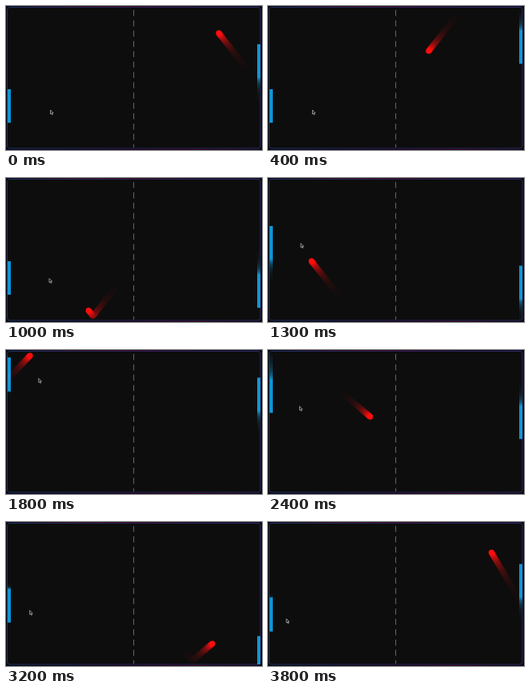
These frames come from a looping animation (320 by 180 pixels, 3900 ms). An HTML page with a canvas:

```html
<!DOCTYPE html>
<html lang="en">
<head>
<meta charset="utf-8">
<title>Paddle game</title>
<style>
html, body { margin: 0; width: 100%; height: 100%; overflow: hidden; background: #07070e; }
canvas { display: block; width: 320px; height: 180px; }
</style>
</head>
<body>
<canvas id="stage" width="320" height="180"></canvas>
<script>
const ctx = document.getElementById('stage').getContext('2d');
const LOOP = 3900, STEP = 100;
const SHADE = 13;                      // grey level of the board
const RED = [255, 0, 0], BLUE = [16, 150, 214];
const PADDLE_H = 41.5, BALL_R = 3.6;

// Linear between key points [time, ...values], held outside them.
function along(keys, t) {
  let i = 1;
  while (i < keys.length - 1 && keys[i][0] < t) i++;
  const [t0, ...from] = keys[i - 1], [t1, ...to] = keys[i];
  const k = Math.min(1, Math.max(0, (t - t0) / (t1 - t0)));
  return from.map((v, n) => v + (to[n] - v) * k);
}

// Folds a steadily growing distance into a bounce between two walls.
function bounce(distance, low, high) {
  const span = high - low;
  const d = ((distance % (2 * span)) + 2 * span) % (2 * span);
  return low + (d < span ? d : 2 * span - d);
}

// Vertical distance travelled; the slope changes at each paddle hit.
const climb = [[-200, -71], [1623, 303.5], [1800, 334], [3572, 577], [3800, 640]];

function ballAt(t) {
  return [
    bounce(0.1628 * t - 264.5, 1.5, 317.5),
    bounce(along(climb, t)[0], 4, 172.5)
  ];
}

// The mouse hand drives both the cursor and the left paddle.
const hand = [
  [1000, 55.5, 130], [1300, 41, 86], [1640, 41, 37], [2270, 40.5, 32],
  [2500, 39, 87], [3200, 30, 110], [3800, 23, 121]
];
const leftAt = t => along(hand, t)[1] - 26;

// The right paddle chases the ball at constant speed, reversing at these times.
const turns = [257, 1113, 1983, 3043];

function rightAt(t) {
  let y = 47.8, last = 0, speed = -0.15;
  for (const turn of turns) {
    if (t < turn) break;
    y += speed * (turn - last);
    last = turn;
    speed = -speed;
  }
  return y + speed * (t - last);
}

function withTrail(color, t, paint) {
  ctx.globalCompositeOperation = 'lighten';
  for (let age = 200; age >= 0; age -= 4) {
    const glow = Math.exp(-age / 50);
    ctx.fillStyle = `rgb(${color.map(c => Math.round(SHADE + (c - SHADE) * glow))})`;
    paint(t - age);
  }
  ctx.globalCompositeOperation = 'source-over';
}

function across(...colors) {
  const g = ctx.createLinearGradient(0, 0, 320, 0);
  colors.forEach((c, i) => g.addColorStop(i / (colors.length - 1), c));
  return g;
}

const topGlow = across('#08081c', '#35081c', '#38081a', '#180820', '#0c0c24');
const bottomGlow = across('#08081c', '#0c0820', '#200820', '#380818', '#100820');
const rim = across('#1c3460', '#2c205a', '#2a2c62');

function drawBoard() {
  ctx.fillStyle = '#07070e';
  ctx.fillRect(0, 0, 320, 180);
  ctx.fillStyle = topGlow;
  ctx.fillRect(0, 0, 320, 1);
  ctx.fillStyle = bottomGlow;
  ctx.fillRect(0, 179, 320, 1);

  ctx.beginPath();
  ctx.roundRect(1.5, 1.5, 316.5, 176.5, 3);
  ctx.fillStyle = `rgb(${SHADE}, ${SHADE}, ${SHADE})`;
  ctx.fill();
  ctx.strokeStyle = rim;
  ctx.lineWidth = 1;
  ctx.stroke();
}

function drawNet() {
  ctx.strokeStyle = '#406a59';
  ctx.lineWidth = 1.2;
  ctx.setLineDash([7.5, 5.4]);
  ctx.beginPath();
  ctx.moveTo(159.6, 5);
  ctx.lineTo(159.6, 177);
  ctx.stroke();
  ctx.setLineDash([]);
}

function drawPaddle(x, yAt, t) {
  withTrail(BLUE, t, at => ctx.fillRect(x, yAt(at), 4, PADDLE_H));
}

function drawBall(t) {
  withTrail(RED, t, at => {
    ctx.beginPath();
    ctx.arc(...ballAt(at), BALL_R, 0, Math.PI * 2);
    ctx.fill();
  });
}

function drawCursor(t) {
  ctx.save();
  ctx.translate(...along(hand, t + 30));
  ctx.beginPath();
  [[0, 0], [0, 5], [1.2, 4], [2, 5.9], [2.9, 5.5], [2.1, 3.7], [3.6, 3.6]]
    .forEach(p => ctx.lineTo(...p));
  ctx.closePath();
  ctx.fillStyle = '#0a0a0a';
  ctx.fill();
  ctx.strokeStyle = '#c8c8c8';
  ctx.lineWidth = 0.7;
  ctx.stroke();
  ctx.restore();
}

function draw(now) {
  const t = Math.floor((now % LOOP) / STEP) * STEP;
  drawBoard();
  ctx.save();
  ctx.beginPath();
  ctx.rect(2, 2, 316, 176);
  ctx.clip();
  drawNet();
  drawPaddle(2, leftAt, t);
  drawPaddle(314, rightAt, t);
  drawBall(t);
  ctx.restore();
  drawCursor(t);
}

let start;
function frame(now) {
  start ??= now;
  draw(Math.max(0, now - start));
  requestAnimationFrame(frame);
}
draw(0);
requestAnimationFrame(frame);
</script>
</body>
</html>
```
